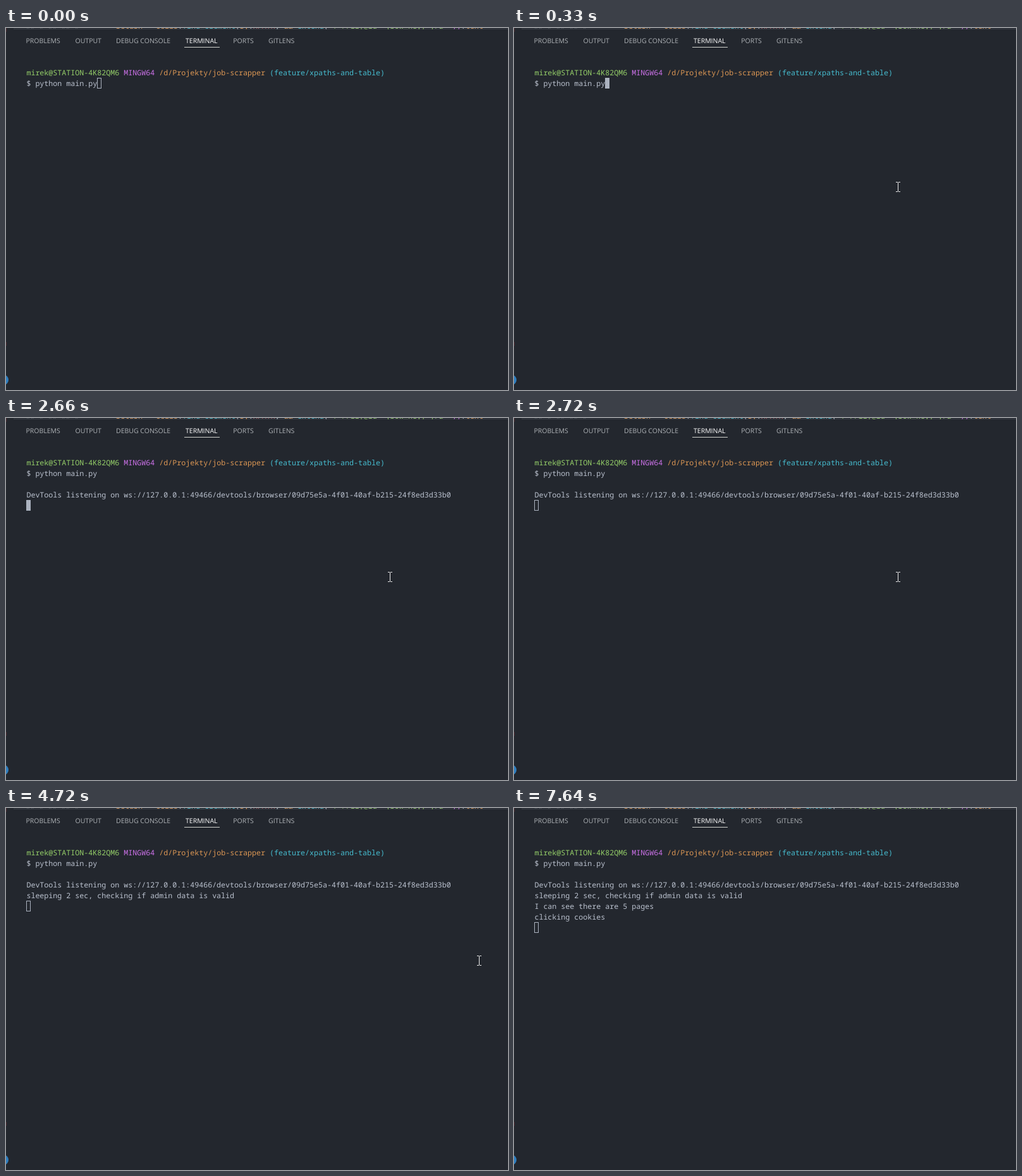
These frames come from a looping animation (794 by 574 pixels, 8 s). An HTML page:

```html
<!DOCTYPE html>
<html lang="en">
<head>
<meta charset="utf-8">
<title>Terminal</title>
<style>
  html, body { margin: 0; height: 100%; overflow: hidden; background: #23272e; }
  svg { display: block; }
  text { white-space: pre; text-rendering: geometricPrecision; }
  .mono { font: 500 11.6667px "Noto Sans Mono", monospace; fill: #bac1ce; }
  .tabs { font: 10.5px "Open Sans", sans-serif; fill: #aeb2b6; }
  .tabs .on { fill: #fff; }
  .orange { fill: #dc9754; }
  .green { fill: #94ce68; }
  .purple { fill: #cd72ea; }
  .cyan { fill: #46bccf; }
  .dim { fill: #5a606a; }
  .red { fill: #c0606a; }
</style>
</head>
<body>
<svg width="794" height="574" viewBox="0 0 794 574">
  <clipPath id="sliver"><path d="M0 0H794V2H0Z"/></clipPath>

  <!-- bottom edge of the editor, above the panel -->
  <path d="M12 1.5H794" stroke="#3b4048"/>
  <g class="mono" clip-path="url(#sliver)">
    <text class="dim" x="32" y="1">## # ## ## #</text>
    <text x="174" y="1"><tspan class="orange">return = cells</tspan>.<tspan class="cyan">find_element</tspan>(<tspan class="orange">By</tspan>.<tspan class="red">XPATH</tspan>, <tspan class="orange">&amp;&amp;</tspan> <tspan class="cyan">extend</tspan>( <tspan class="green">f"//li[@id='{row_key}']/a"</tspan> <tspan class="purple">))</tspan>.<tspan class="orange">text</tspan></text>
  </g>

  <!-- remains of the side bar -->
  <path d="M0 0H1V6H0ZM0 498H1V504H0Z" fill="#4d2a32"/>
  <circle cx="-4" cy="558" r="8" fill="#2f7fc0"/>

  <g class="tabs">
    <text x="31.5" y="24">PROBLEMS</text>
    <text x="109.5" y="24">OUTPUT</text>
    <text x="174" y="24">DEBUG CONSOLE</text>
    <text class="on" x="284" y="24">TERMINAL</text>
    <text x="359.3" y="24">PORTS</text>
    <text x="415" y="24">GITLENS</text>
  </g>
  <path d="M282 30.5H338" stroke="#d0d2cc"/>

  <g class="mono">
    <text x="32.4" y="75"><tspan class="green">mirek@STATION-4K82QM6</tspan> <tspan class="purple">MINGW64</tspan> <tspan class="orange">/d/Projekty/job-scrapper</tspan> <tspan class="cyan">(feature/xpaths-and-table)</tspan></text>
    <text x="32.4" y="92">$ python main.py</text>
    <g id="log"></g>
  </g>

  <rect id="caret" width="6" height="16" stroke="#abb2bf"/>
  <g id="pointer" fill="none">
    <path d="M-3 -7.5H0M1 -7.5H4M-3 7.5H0M1 7.5H4M.5 -7V7" stroke="#f0f0f0"/>
  </g>
</svg>
<script>
const LOOP = 8000, LEFT = 32, TOP = 62, CHAR = 7, ROW = 17;
const $ = id => document.getElementById(id);

// output lines: time, row, text
const lines = [
  [2660, 3, 'DevTools listening on ws://127.0.0.1:49466/devtools/browser/09d75e5a-4f01-40af-b215-24f8ed3d33b0'],
  [3850, 4, 'sleeping 2 sec, checking if admin data is valid'],
  [7640, 5, 'I can see there are 5 pages'],
  [7640, 6, 'clicking cookies']
].map(([time, row, text]) => {
  const el = document.createElementNS('http://www.w3.org/2000/svg', 'text');
  el.setAttribute('x', LEFT + 0.4);
  el.setAttribute('y', TOP + row * ROW + 13);
  el.textContent = text;
  $('log').append(el);
  return { time, el };
});

// caret stops: time, column, row
const stops = [[0, 16, 1], [1060, 0, 2], [2660, 0, 4], [3850, 0, 5], [7640, 0, 7]];

function pointerAt(t) {
  if (t < 70 || t >= 4780) return null;
  if (t >= 4720) return [748, 242];
  const left = 1 - Math.min(3, Math.floor((t - 70) / 65)) / 3;
  const ease = left * left;
  return [Math.round(607 + 113 * ease), Math.round(252 + 195 * ease)];
}

function draw(t) {
  for (const { time, el } of lines) el.setAttribute('visibility', t >= time ? 'visible' : 'hidden');

  const [, col, row] = stops.filter(s => t >= s[0]).pop();
  const focused = t >= 330 && t < 2720;
  $('caret').setAttribute('x', LEFT + col * CHAR + 0.5);
  $('caret').setAttribute('y', TOP + row * ROW + 0.5);
  $('caret').setAttribute('fill', focused ? '#abb2bf' : 'none');

  const pos = pointerAt(t);
  $('pointer').setAttribute('visibility', pos ? 'visible' : 'hidden');
  if (pos) $('pointer').setAttribute('transform', `translate(${pos})`);
}

const start = performance.now();
function tick() {
  draw((performance.now() - start) % LOOP);
  requestAnimationFrame(tick);
}
tick();
</script>
</body>
</html>
```
